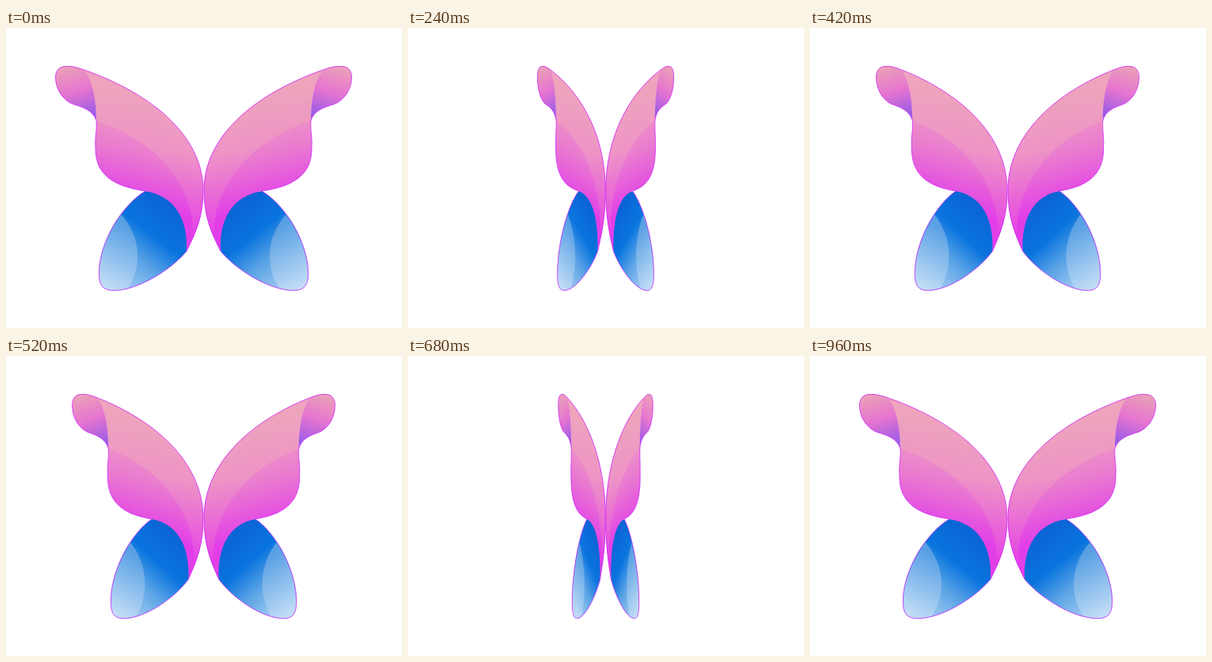
Write an HTML page that moves like this. It is 500x379 px and loops after 1.22 s.

```html
<!DOCTYPE html>
<html lang="en">
<head>
<meta charset="utf-8">
<title>Butterfly</title>
<style>
  html, body { margin: 0; width: 100%; height: 100%; overflow: hidden; background: #fff; }
  svg { display: block; width: 100%; height: 100%; }
  .rim { fill: none; stroke: #d01cff; stroke-width: 1; vector-effect: non-scaling-stroke; }
</style>
</head>
<body>
<svg viewBox="0 0 500 379">
  <defs>
    <linearGradient id="blue" gradientUnits="userSpaceOnUse" x1="207" y1="218" x2="124" y2="322">
      <stop offset="0" stop-color="#0a62d4"/>
      <stop offset=".36" stop-color="#0a74de"/>
      <stop offset=".62" stop-color="#5aa3e6"/>
      <stop offset="1" stop-color="#b4d5f3"/>
    </linearGradient>
    <linearGradient id="pale" gradientUnits="userSpaceOnUse" x1="160" y1="255" x2="122" y2="325">
      <stop offset="0" stop-color="#58a0e4"/>
      <stop offset="1" stop-color="#c2ddf6"/>
    </linearGradient>
    <linearGradient id="pink" gradientUnits="userSpaceOnUse" x1="186" y1="112" x2="158" y2="222">
      <stop offset="0" stop-color="#f09cc2"/>
      <stop offset=".45" stop-color="#e97ad0"/>
      <stop offset="1" stop-color="#e23ee8"/>
    </linearGradient>
    <linearGradient id="peach" gradientUnits="userSpaceOnUse" x1="175" y1="80" x2="150" y2="250">
      <stop offset="0" stop-color="#eea4bc"/>
      <stop offset=".4" stop-color="#ee94c6"/>
      <stop offset="1" stop-color="#e440e6"/>
    </linearGradient>
    <linearGradient id="tip" gradientUnits="userSpaceOnUse" x1="80" y1="48" x2="100" y2="112">
      <stop offset="0" stop-color="#eaa0b8"/>
      <stop offset=".5" stop-color="#e674d0"/>
      <stop offset="1" stop-color="#9a5ce6"/>
    </linearGradient>
    <g id="wing">
      <path fill="url(#blue)" d="M176 206C148 222 117 270 117 310C117 326 123 332 136 332C166 332 208 306 228 282C236 245 215 208 176 206Z"/>
      <path fill="url(#pale)" d="M145 235C128 257 117 287 117 310C117 326 123 332 136 332Q144 332 153 330C172 302 171 264 145 235Z"/>
      <path fill="url(#pink)" d="M99 53C190 85 249 140 249 205C249 238 240 258 228 282C230 240 212 212 176 206C135 200 112 185 113 150C112 138 115 130 114 117C114 85 108 65 99 53Z"/>
      <path fill="url(#peach)" d="M99 53C190 85 249 140 249 205C249 230 244 246 236 266C240 200 190 142 114 117C114 85 108 65 99 53Z"/>
      <path fill="url(#tip)" d="M99 53C88 49 82 47.5 75 48C66 48.5 62.5 55 62.5 62C62.5 78 72 91 84 96C97 100 110 104 114 117C114 85 108 65 99 53Z"/>
      <path class="rim" d="M176 206C148 222 117.5 270 117.5 310C117.5 326 123 331.5 136 331.5C166 331.5 208 306 228 282C240 258 249 238 249 205C249 140 190 85 99 53C88 49 82 48 75 48.5C66 49 62.5 55 62.5 62C62.5 78 72 91 84 96C97 100 110 104 114 117C115 130 112 138 113 150C112 185 135 200 176 206" stroke-opacity=".75"/>
    </g>
  </defs>
  <g id="fly">
    <use href="#wing"/>
    <use href="#wing" transform="matrix(-1 0 0 1 499 0)"/>
  </g>
</svg>
<script>
  const LOOP = 1220, SPIN = 980, STEP = 20, AXIS = 249.5;
  const fly = document.getElementById('fly');
  const ease = p => p * p * (3 - 2 * p);

  // One full eased turn about the vertical axis, then a rest.
  function draw() {
    const t = Math.floor(performance.now() % LOOP / STEP) * STEP;
    const p = Math.min(1, (t + STEP) / SPIN);
    const sx = Math.cos(2 * Math.PI * ease(p));
    fly.setAttribute('transform', `matrix(${sx} 0 0 1 ${AXIS * (1 - sx)} 0)`);
    requestAnimationFrame(draw);
  }
  draw();
</script>
</body>
</html>
```
